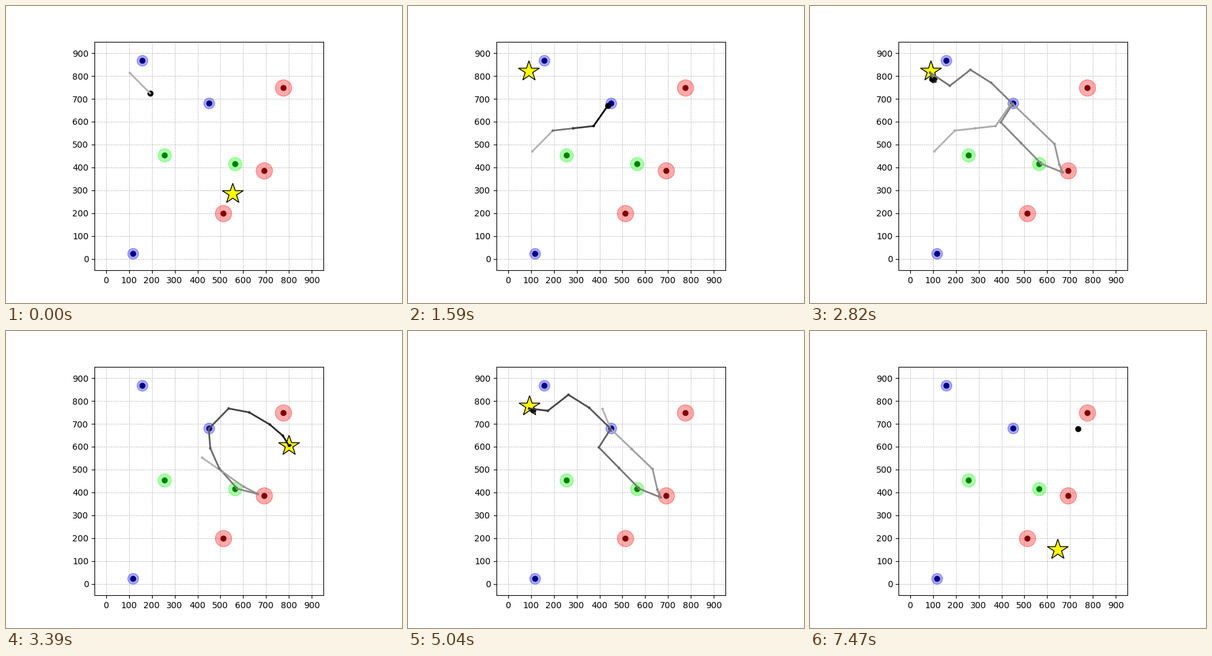
Animation, 640 px wide and 480 px high, one loop 7.5 s. Source, as a matplotlib script:

```python
import math

import numpy as np
import matplotlib.pyplot as plt
from matplotlib.animation import FuncAnimation
from matplotlib.collections import LineCollection

FRAMES, INTERVAL, EPISODE = 250, 30, 50
MAX_STEP, JITTER = 95, 4

# fill, core colour, marker size, positions
ZONES = [
    ("red", "maroon", 19, [(773.5, 749), (691.6, 385), (512, 199.5)]),
    ("lime", "green", 15.5, [(255, 454), (563.6, 416)]),
    ("blue", "navy", 12.5, [(156.5, 866.5), (450, 680), (117.5, 24)]),
]

# where the agent touches the zones, and the legs several runs share
RED, GREEN, BLUE, TURN = (668, 378), (574, 416), (449, 678), (397, 597)
LOOP = [BLUE, (632, 502), (653, 412), RED, GREEN, TURN, BLUE]
HOME = [(355, 770), (264, 827), (174, 757)]

# goal, key points from start to resting place
RUNS = [
    ((553.6, 287), [(103, 814), (193, 724), *LOOP, (554, 287)]),
    ((91, 823), [(106, 470), (196, 561), (374, 581), (437, 671),
                 *LOOP, *HOME, (87, 815), (105, 781)]),
    ((800, 606), [(420, 552), (602, 425), (664, 393), GREEN, (495, 505),
                  (456, 593), BLUE, (536, 767), (626, 750), (716, 697),
                  (773, 648), (800, 604)]),
    ((94, 779), [(413, 765), *LOOP, *HOME, (92, 767), (110, 754)]),
    ((394.5, 602), [(670, 72), (672, 250), (703, 341), (665, 402), GREEN,
                    TURN, BLUE, (363, 592), (394, 600)]),
    ((645.6, 150), [(734, 678.5)]),
]

rng = np.random.default_rng(3)


def walk(keys):
    """Bounded steps from key to key, then hovering around the last one."""
    pts = [np.array(keys[0], float)]
    for key in keys[1:]:
        start, delta = pts[-1], np.subtract(key, pts[-1])
        n = math.ceil(np.abs(delta).max() / MAX_STEP)
        pts += [start + delta * i / n for i in range(1, n + 1)]
    hover = rng.normal(keys[-1], JITTER, (EPISODE - len(pts), 2))
    return np.vstack([pts, hover])


PATHS = [walk(keys) for _, keys in RUNS]

fig, ax = plt.subplots(figsize=(6.4, 4.8), dpi=100)
ax.set_aspect("equal")
ax.set(xlim=(-50, 950), ylim=(-50, 950),
       xticks=range(0, 1000, 100), yticks=range(0, 1000, 100))
ax.grid(linestyle="--", linewidth=0.5)
ax.set_axisbelow(True)

for fill, core, size, spots in ZONES:
    xs, ys = zip(*spots)
    ax.plot(xs, ys, "o", color=fill, ms=size, alpha=0.33)
    ax.plot(xs, ys, "o", color=core, ms=6)

agent, = ax.plot([], [], "o", color="black", ms=6, zorder=3)
goal, = ax.plot([], [], "*", mfc="yellow", mec="black", ms=25, zorder=4)
trail = LineCollection([], linewidths=2, capstyle="projecting", zorder=5)
ax.add_collection(trail, autolim=False)
dots = ax.scatter([], [], s=16, marker=".", linewidths=1, zorder=6)


def update(frame):
    run, n = divmod(frame + 1, EPISODE)
    pts = PATHS[run][:n + 1]
    agent.set_data(pts[-1:, 0], pts[-1:, 1])
    goal.set_data(*([v] for v in RUNS[run][0]))

    # older steps fade to light grey
    greys = [str(g) for g in np.linspace(0.7, 0, n)]
    trail.set_segments(np.stack([pts[:-1], pts[1:]], axis=1))
    trail.set_color(greys)
    dots.set_offsets(pts[:-1])
    dots.set_color(greys)
    return agent, goal, trail, dots


anim = FuncAnimation(fig, update, frames=FRAMES, interval=INTERVAL,
                     init_func=lambda: update(0), repeat=True, repeat_delay=0)
plt.show()
```
